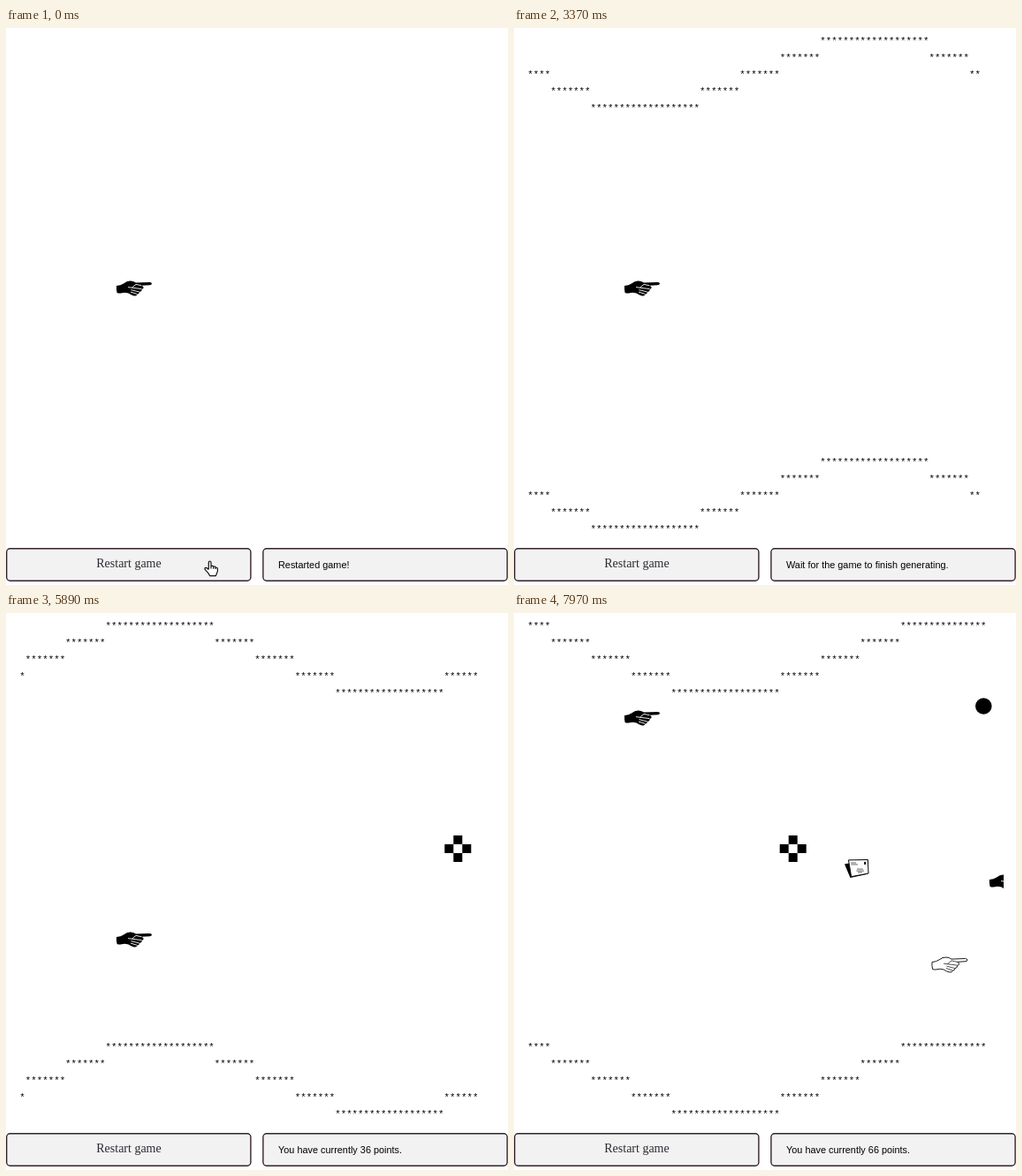
Recreate the animation shown at these times as an HTML page with a canvas. Size 568x631 px, loop 8 s.

```html
<!DOCTYPE html>
<html lang="en">
<head>
<meta charset="utf-8">
<title>Tunnel game</title>
<style>
  html, body { margin: 0; width: 100%; height: 100%; overflow: hidden; background: #fff; }
  canvas, svg { position: absolute; left: 0; top: 0; width: 568px; height: 631px; }
  rect { fill: #f2f2f2; stroke: #35232f; stroke-width: 1.4; }
  .label { font: 14px "Liberation Serif", serif; fill: #2b2b33; text-anchor: middle; }
  .status { font: 10.9px "Liberation Sans", Arial, sans-serif; fill: #000; }
</style>
</head>
<body>
<canvas id="field" width="568" height="631"></canvas>
<svg viewBox="0 0 568 631">
  <rect x="0.7" y="589.8" width="276.2" height="36.4" rx="4"/>
  <rect x="290.9" y="589.8" width="276.2" height="36.4" rx="4"/>
  <text class="label" x="139" y="611">Restart game</text>
  <text class="status" id="status" x="308" y="612"></text>
  <path id="cursor" fill="#fff" stroke="#111" stroke-width="1.2" stroke-linejoin="round"
    d="M229.3 613V605.6Q229.3 604 230.6 604Q232 604 232 605.6V609.6Q234.4 608.8 234.7 610.2Q236.8 609.6 237.1 611Q239.4 610.8 239.4 612.8V615.4Q238.6 617.6 237.4 620.6H230.6Q229.6 618 226.2 614.6Q224.2 612.4 225.4 611.6Q226.8 610.8 229.3 613.6M232 609.6V612.6M234.7 610.4V612.8M237.1 611.2V613"/>
</svg>
<script>
const LOOP = 8000, COLS = 80, PITCH = 6.49, ROW = 19, STEP = 6.52;
const ctx = document.getElementById('field').getContext('2d');
const status = document.getElementById('status');
const cursor = document.getElementById('cursor');

// Knots are [input, value] pairs.
const DRAWN = [[70, 1], [840, 18], [1680, 40], [2240, 53], [2520, 59], [3370, 79], [3440, 80]];
const SCORE = [[3440, 0], [4070, 9], [4840, 21], [5890, 36], [6730, 48], [6780, 49], [7970, 66]];
const PLAYER_Y = [[0, 295], [9, 319.5], [21, 346.5], [36, 370], [40, 380], [52, 201], [66, 119]];

// Left edge and centre height of each obstacle when the score is 66.
const OBSTACLES = [
  [cross, 300.7, 267],
  [letters, 374, 289.5],
  [whiteHand, 473, 398.5],
  [blackHand, 538, 305],
  [ball, 522, 105.5]
];

const HAND = new Path2D('M0 6Q5 5.6 8 3.4Q12 .2 16 .5Q20 .8 22 2.6L37.5 2Q40 2.2 40 3.6Q40 5 38 5.2L28.5 5.8Q31 6.8 30.6 8.4Q30 9.8 28.6 9.8Q29 12.6 26 13Q26 15.2 23.8 15.4Q22.6 18 20 17.4Q16.4 16.8 13.6 14.6Q9 13 6 14.2Q3 15 .6 14Q-.4 10 0 6Z');
const FINGERS = new Path2D('M13 7.6L17.4 8.2L22 4.4M17.4 8.2L28.4 9.6M16.4 10.6L25.8 13M16 13L23.4 15.4M22 4.4L28.4 5.8');

function lerp(knots, v) {
  let [a, b] = knots[0];
  if (v <= a) return b;
  for (const [x, y] of knots) {
    if (v <= x) return b + (y - b) * (v - a) / (x - a);
    [a, b] = [x, y];
  }
  return b;
}

const whole = (knots, t) => Math.floor(lerp(knots, t) + 0.01);

// Row of the tunnel wall: 19 flat, three ramps of 7, 19 flat, three ramps back.
function wallRow(k) {
  k = ((k % 80) + 80) % 80;
  if (k < 19) return 4;
  if (k < 40) return 3 - Math.floor((k - 19) / 7);
  if (k < 59) return 0;
  return 1 + Math.floor((k - 59) / 7);
}

function blackHand() {
  ctx.translate(0, -9);
  ctx.fill(HAND);
  ctx.strokeStyle = '#fff';
  ctx.lineWidth = 0.9;
  ctx.stroke(FINGERS);
}

function whiteHand() {
  ctx.translate(0, -9);
  ctx.strokeStyle = '#000';
  ctx.lineWidth = 0.9;
  ctx.stroke(HAND);
  ctx.lineWidth = 0.7;
  ctx.stroke(FINGERS);
}

function cross() {
  const a = 9.8;
  for (const [x, y] of [[1, 0], [0, 1], [2, 1], [1, 2]]) {
    ctx.fillRect(Math.round(x * a), Math.round((y - 1.5) * a), 10, 10);
  }
}

function ball() {
  ctx.beginPath();
  ctx.arc(9.3, 0, 9.3, 0, 7);
  ctx.fill();
}

function letters() {
  ctx.fill(new Path2D('M0 -5L5 -6L8 8L20 5L27 6L6.5 10.6Z'));
  const card = new Path2D('M4.5 -9.6L26.4 -10L27 5.5L7.6 9.2Z');
  ctx.fillStyle = '#fff';
  ctx.fill(card);
  ctx.strokeStyle = '#000';
  ctx.lineWidth = 1;
  ctx.stroke(card);
  ctx.lineWidth = 0.6;
  ctx.stroke(new Path2D('M7 -6.5H13M7.4 -4.6H15M14 .6H21M13.4 2.6H22M15 4.4H20'));
  ctx.fillStyle = '#000';
  ctx.fillRect(22.2, -7.6, 2, 3);
}

function place(draw, x, y) {
  ctx.save();
  ctx.translate(x, y);
  ctx.fillStyle = '#000';
  draw();
  ctx.restore();
}

function drawWalls(count, score) {
  ctx.font = '10.8px "Liberation Mono", monospace';
  ctx.fillStyle = '#000';
  const m = ctx.measureText('*');
  const left = 16.2 + m.actualBoundingBoxLeft;
  const base = 12 + (m.actualBoundingBoxAscent - m.actualBoundingBoxDescent) / 2;
  for (let i = 0; i < count; i++) {
    const x = left + i * PITCH;
    const y = base + wallRow(i - 11 + score) * ROW;
    ctx.fillText('*', x, y);
    ctx.fillText('*', x, y + 477);
  }
}

function message(t, score) {
  if (t < 140) return 'Restarted game!';
  if (t < 3440) return 'Wait for the game to finish generating.';
  return `You have currently ${score} points.`;
}

function render(t) {
  const score = whole(SCORE, t);
  ctx.clearRect(0, 0, 568, 631);
  ctx.save();
  ctx.beginPath();
  ctx.rect(0, 0, 554, 588);
  ctx.clip();
  drawWalls(t < 70 ? 0 : Math.min(COLS, whole(DRAWN, t)), score);
  for (const [draw, x, y] of OBSTACLES) {
    place(draw, x + (66 - score) * STEP, y);
  }
  place(blackHand, 125, lerp(PLAYER_Y, score));
  ctx.restore();
  const text = message(t, score);
  if (status.textContent !== text) status.textContent = text;
  cursor.style.visibility = t < 210 ? 'visible' : 'hidden';
}

let start;
function tick(now) {
  start ??= now;
  render((now - start) % LOOP);
  requestAnimationFrame(tick);
}
render(0);
requestAnimationFrame(tick);
</script>
</body>
</html>
```
